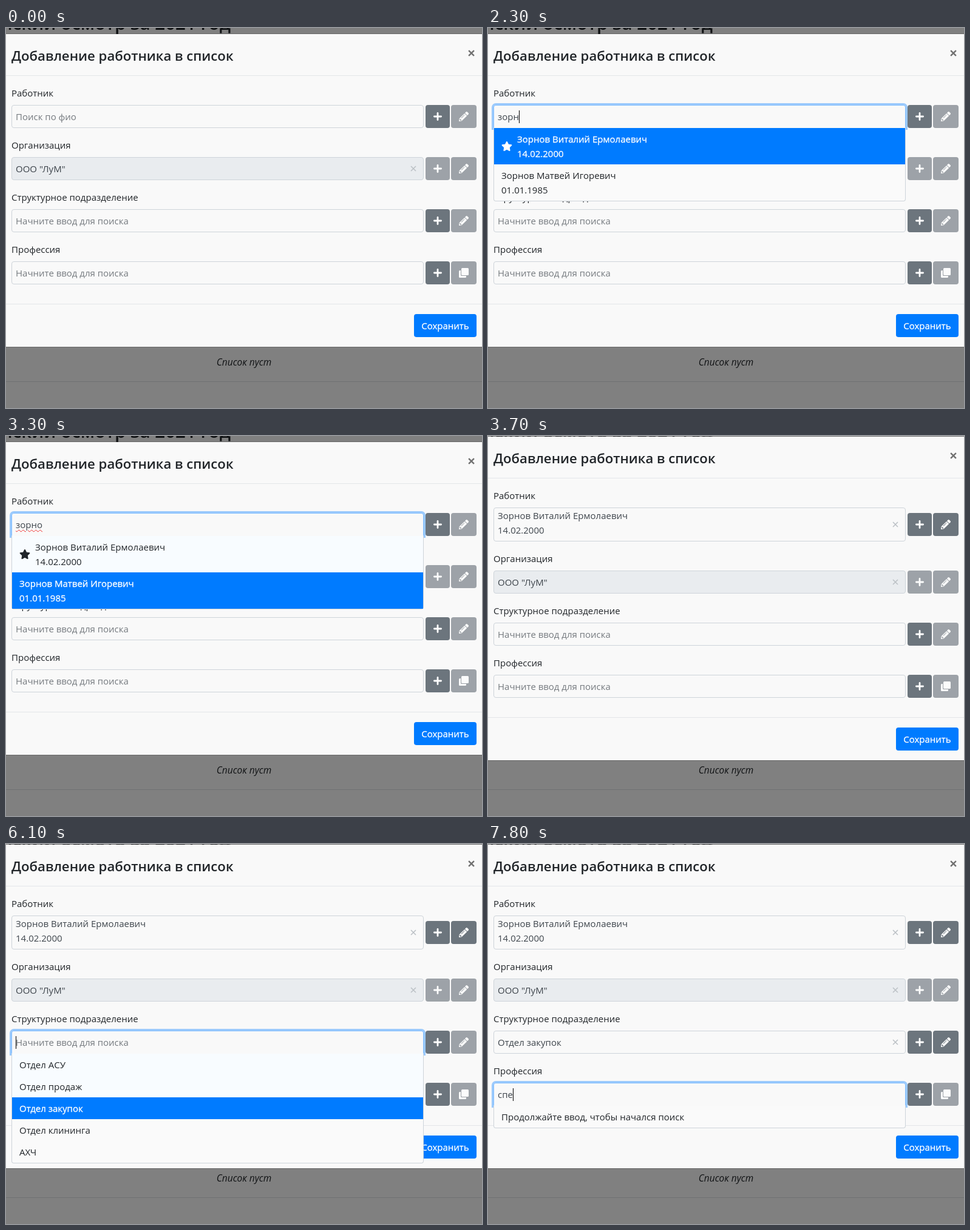
An HTML page for the animation above (8 s loop, 784x627 px).

```html
<!DOCTYPE html>
<html lang="ru">
<head>
<meta charset="utf-8">
<title>Добавление работника</title>
<style>
* { box-sizing: border-box; }
html, body { margin: 0; width: 100%; height: 100%; overflow: hidden; }
body { position: relative; background: #808080; color: #212529; font: 15px/24px "Open Sans", "Noto Sans", sans-serif; }
svg { display: block; fill: #fff; }
.page { position: absolute; color: #101214; white-space: nowrap; }
.heading { right: 414px; top: -29px; font-size: 29.6px; line-height: 42px; font-weight: 600; }
.empty { left: 0; width: 784px; top: 539px; text-align: center; font-style: italic; font-size: 15.5px; }
.rule { left: 0; width: 784px; top: 583px; height: 1px; background: #6f7173; }
#dialog { position: absolute; left: 0; top: 268px; width: 784px; transform: translateY(-50%); background: #f9f9f9; box-shadow: 0 0 0 1px rgba(0,0,0,.2); }
header { position: relative; height: 69px; padding: 18px 9px; border-bottom: 1px solid #e4e6e9; font-size: 22.2px; line-height: 36px; font-weight: 600; }
header svg { position: absolute; left: 761px; top: 26px; stroke: #717171; stroke-width: 2.2; }
main { padding: 16px 9px; }
.group { margin-bottom: 16px; }
.label { margin-bottom: 8px; }
.line { display: flex; align-items: center; }
.field { position: relative; width: 679px; height: 38px; padding: 6px; border: 1px solid #ced4da; border-radius: 4px; color: #3f464d; white-space: nowrap; }
.tall { height: 56px; padding-top: 0; }
.locked { background: #e9ecef; }
.focus { border-color: #80bdff; box-shadow: 0 0 0 3px rgba(0,123,255,.38); }
.open { border-bottom-color: #f9f9f9; border-radius: 4px 4px 0 0; }
.hint { color: #757a7f; }
.misspelt { text-decoration: underline wavy #f03030 1px; text-underline-offset: 2px; }
.caret { position: relative; }
.caret::after { content: ""; position: absolute; left: 0; top: 0; width: 1px; height: 21px; background: #000; }
.clear { position: absolute; left: 656px; top: calc(50% - 5px); stroke: #bcc1c6; stroke-width: 1.6; }
.menu { position: absolute; z-index: 2; left: -1px; top: calc(100% + 1px); width: 679px; background: #fafafa; border: 1px solid #ced4da; border-top: 0; border-radius: 0 0 4px 4px; color: #212529; }
.item { display: flex; align-items: center; padding: 6px 12px; }
.item svg { margin-right: 8px; fill: currentColor; }
.passed { background: #f8fcff; }
.active { background: #007bff; color: #fff; }
.active, .save { -webkit-text-stroke: .3px #fff; }
.button { width: 40px; height: 38px; margin-left: 3px; border-radius: 4px; background: #6c757d; display: grid; place-items: center; }
.button + .button { width: 42px; margin-left: 2px; }
.off { opacity: .65; }
footer { height: 71px; padding: 16px 9px; border-top: 1px solid #e4e6e9; }
.save { width: 103px; margin-left: auto; line-height: 38px; text-align: center; border-radius: 4px; background: #007bff; color: #fff; }
</style>
</head>
<body>
<div class="page heading">Периодический медицинский осмотр за 2021 год</div>
<div class="page empty">Список пуст</div>
<div class="page rule"></div>
<div id="dialog"></div>
<script>
const LOOP = 8000;
const svg = (w, h, box, body, cls = '') =>
  `<svg class="${cls}" width="${w}" height="${h}" viewBox="0 0 ${box}">${body}</svg>`;
const cross = (size, cls) => svg(size, size, '10 10', '<path d="M1 1 9 9M9 1 1 9"/>', cls);
const icons = {
  plus: svg(14, 14, '14 14', '<path d="M7 1.4V12.6M1.4 7H12.6" stroke="#fff" stroke-width="2.8" stroke-linecap="round"/>'),
  pencil: svg(16, 16, '512 512', '<path d="M498 142l-46 46c-5 5-13 5-17 0L324 77c-5-5-5-12 0-17l46-46c19-19 49-19 68 0l60 60c19 19 19 49 0 68zM284 100L22 362 0 484c-3 16 12 30 28 28l122-22 262-262c5-5 5-13 0-17L301 100c-4-5-12-5-17 0zM124 340c-5-5-5-13 0-18l154-154c5-5 13-5 18 0s5 13 0 18L142 340c-5 5-13 5-18 0zm-36 84h48v36l-64 11-31-31 11-64h36z"/>'),
  copy: svg(16, 16, '16 16', '<rect x="4" width="12" height="12" rx="1.5"/><path d="M0 5.5A1.5 1.5 0 0 1 1.5 4H3v7.5A1.5 1.5 0 0 0 4.5 13H12v1.5a1.5 1.5 0 0 1-1.5 1.5h-9A1.5 1.5 0 0 1 0 14.5z"/>'),
  star: svg(18, 16, '576 512', '<path d="M259 18L194 150 48 171c-26 4-37 36-18 55l106 103-25 145c-4 26 23 46 46 34l131-69 131 69c23 12 50-8 46-34L440 329l106-103c19-19 8-51-18-55L382 150 317 18c-12-24-46-24-58 0z"/>')
};

const person = 'Зорнов Виталий Ермолаевич<br>14.02.2000';
const people = [`${icons.star}<div>${person}</div>`, '<div>Зорнов Матвей Игоревич<br>01.01.1985</div>'];
const departments = ['Отдел АСУ', 'Отдел продаж', 'Отдел закупок', 'Отдел клининга', 'АХЧ'];
const keepTyping = ['Продолжайте ввод, чтобы начался поиск'];
const searchHint = 'Начните ввод для поиска';

const menu = (items, active = -1) => `<div class="menu">${items.map((text, i) =>
  `<div class="item ${i === active ? 'active' : i < active ? 'passed' : ''}">${text}</div>`).join('')}</div>`;

const filled = (text, cls = '') => `<div class="field ${cls}">${text}${cross(10, 'clear')}</div>`;
const idle = hint => `<div class="field"><span class="hint">${hint}</span></div>`;

// The first time in keys is the moment of focus; each later one types a letter.
function focused(t, hint, keys, word, list = '', misspelt = false) {
  const pressed = keys.filter(time => time <= t);
  const text = word.slice(0, pressed.length - 1);
  const lit = Math.floor((t - pressed.at(-1)) / 500) % 2 === 0;
  const caret = lit ? '<span class="caret"></span>' : '';
  const typed = `<span class="${misspelt ? 'misspelt' : ''}">${text}</span>${caret}`;
  return `<div class="field focus ${list && 'open'}">${typed}${text ? '' : `<span class="hint">${hint}</span>`}${list}</div>`;
}

function workerField(t) {
  const hint = 'Поиск по фио';
  if (t < 700) return idle(hint);
  if (t >= 3700) return filled(person, 'tall');
  const list = t < 1500 ? '' : t < 2300 ? menu(keepTyping) : menu(people, t >= 3000 && t < 3400 ? 1 : 0);
  return focused(t, hint, [700, 1500, 1800, 2000, 2200, 2400], 'зорно', list, t >= 2900);
}

function departmentField(t) {
  if (t < 5100) return idle(searchHint);
  if (t >= 6300) return filled(departments[2], t < 6400 ? 'focus' : '');
  const active = t < 5900 ? 0 : t < 6100 ? 1 : 2;
  return focused(t, searchHint, [5100], '', t < 5200 ? '' : menu(departments, active));
}

function professionField(t) {
  if (t < 6900) return idle(searchHint);
  return focused(t, searchHint, [6900, 7300, 7600, 7800], 'спе', t < 7300 ? '' : menu(keepTyping));
}

const button = (icon, on) => `<div class="button ${on ? '' : 'off'}">${icons[icon]}</div>`;
const group = (label, field, canAdd, canEdit, icon = 'pencil') =>
  `<div class="group"><div class="label">${label}</div>
  <div class="line">${field}${button('plus', canAdd)}${button(icon, canEdit)}</div></div>`;

const view = t => `<header>Добавление работника в список${cross(11)}</header><main>
  ${group('Работник', workerField(t), true, t >= 3700)}
  ${group('Организация', filled('ООО "ЛуМ"', 'locked'), false, false)}
  ${group('Структурное подразделение', departmentField(t), true, t >= 6300)}
  ${group('Профессия', professionField(t), true, false, 'copy')}
  </main><footer><div class="save">Сохранить</div></footer>`;

const dialog = document.getElementById('dialog');
const start = performance.now();
let shown = '';
function draw() {
  const html = view((performance.now() - start) % LOOP);
  if (html !== shown) dialog.innerHTML = shown = html;
  requestAnimationFrame(draw);
}
draw();
</script>
</body>
</html>
```
